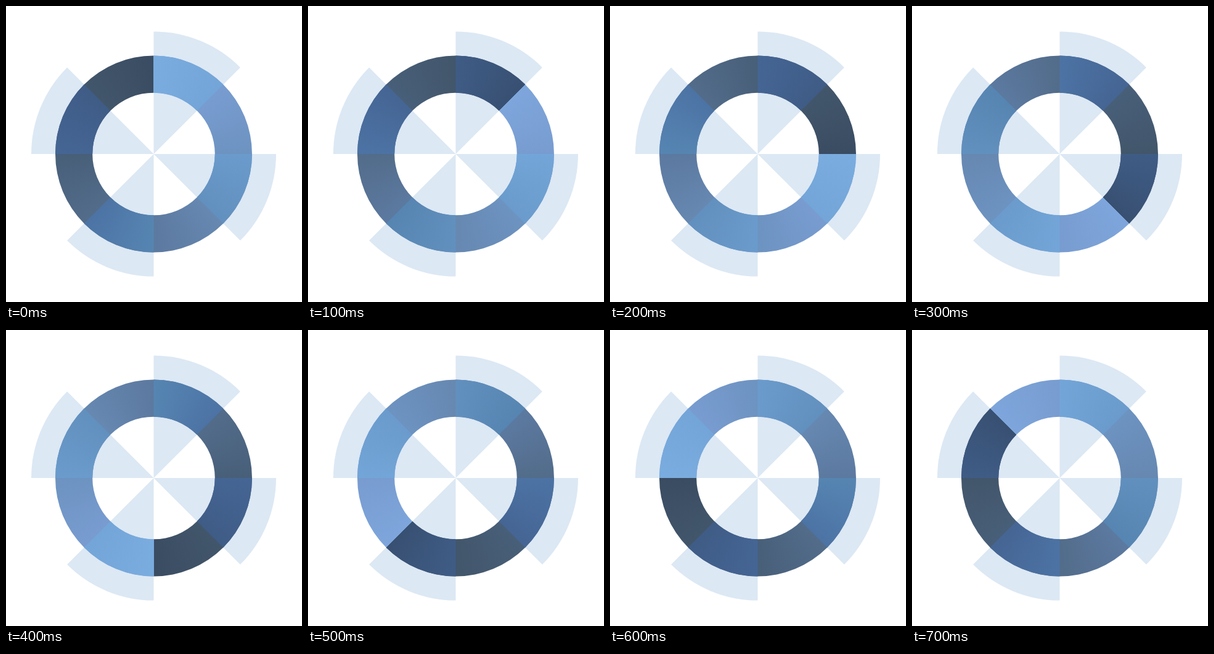
Animation of 480 by 480 pixels, one loop 800 ms. Source, as an HTML page with a canvas:

```html
<!DOCTYPE html>
<html lang="en">
<head>
<meta charset="utf-8">
<title>Spinner</title>
<style>
html, body { margin: 0; height: 100%; overflow: hidden; background: #fff; }
canvas { display: block; }
</style>
</head>
<body>
<canvas id="stage" width="480" height="480"></canvas>
<script>
const ctx = document.getElementById('stage').getContext('2d');
const CX = 239.5, CY = 240;
const BLADE_R = 198.5, OUTER = 159.5, INNER = 99.3;
const EIGHTH = Math.PI / 4, TOP = -Math.PI / 2;
const STEP_MS = 100;

// Ring colours at every eighth turn, over white and over a blade
const plain = ['#7ea6dc', '#789cd0', '#6d93c1', '#6688b1', '#5c79a0', '#526c8a', '#485f79', '#42566b', '#3a4c62'];
const tinted = ['#7aacdf', '#73a5d8', '#6a9bcc', '#6290be', '#5685b2', '#4c73a4', '#456594', '#3f5c86', '#385072'];

function ringFill(colors, turn) {
  const fill = ctx.createConicGradient(TOP + turn, CX, CY);
  colors.forEach((color, i) => fill.addColorStop(i / 8, color));
  return fill;
}

function band(from, to, inner, outer, fill) {
  ctx.beginPath();
  ctx.arc(CX, CY, outer, from, to);
  ctx.arc(CX, CY, inner, to, from, true);
  ctx.fillStyle = fill;
  ctx.fill();
}

function blades(inner, outer, fill) {
  for (let i = 0; i < 8; i += 2) {
    const from = TOP + i * EIGHTH;
    band(from, from + EIGHTH, inner, outer, fill);
  }
}

function draw(ms) {
  const turn = Math.floor(ms / STEP_MS) % 8 * EIGHTH;
  ctx.fillStyle = '#fff';
  ctx.fillRect(0, 0, 480, 480);
  blades(0, BLADE_R, '#dce8f4');
  band(0, 2 * Math.PI, INNER, OUTER, ringFill(plain, turn));
  blades(INNER, OUTER, ringFill(tinted, turn));
}

const start = performance.now();
function tick() {
  draw(performance.now() - start);
  requestAnimationFrame(tick);
}
tick();
</script>
</body>
</html>
```
